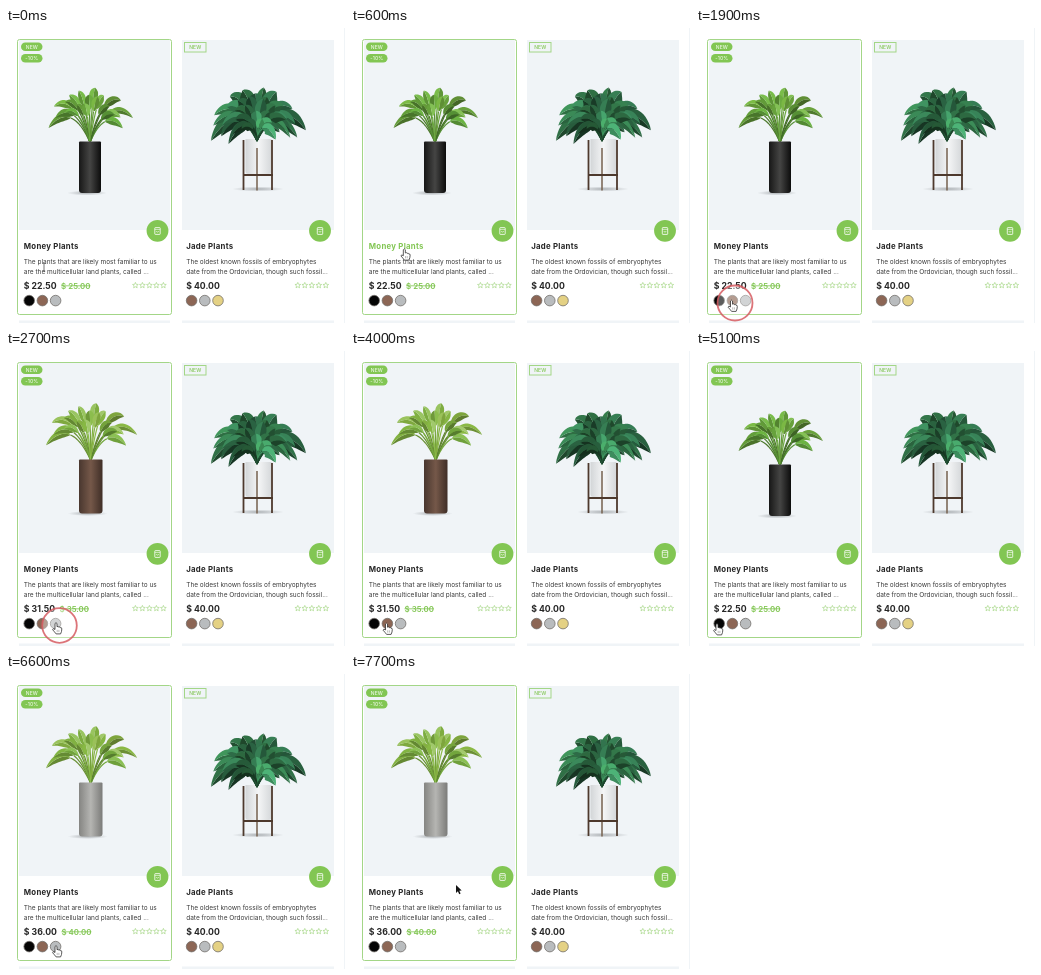
Write an HTML page with a canvas that moves like this. It is 339 by 295 pixels and loops after 7800 ms.

```html
<!DOCTYPE html>
<html lang="en">
<head>
<meta charset="utf-8">
<title>Plant shop</title>
<style>
html, body { margin: 0; width: 100%; height: 100%; overflow: hidden; background: #fff; }
canvas { display: block; width: 339px; height: 295px; }
</style>
</head>
<body>
<canvas id="stage"></canvas>
<script>
const W = 339, H = 295, LOOP = 7800;
const GREEN = '#82c653', INK = '#262626', RING = '#74706d';
const BROWN = '#8c6655', GRAY = '#b9bcbe';
const stage = document.getElementById('stage');
const scale = Math.max(1, window.devicePixelRatio || 1);
stage.width = W * scale;
stage.height = H * scale;
const g = stage.getContext('2d');

const variants = [
  { price: '$ 22.50', old: '$ 25.00', pot: ['#171717', '#454544', '#0c0c0c'] },
  { price: '$ 31.50', old: '$ 35.00', pot: ['#49372f', '#755849', '#3f2e27'] },
  { price: '$ 36.00', old: '$ 40.00', pot: ['#858582', '#b5b5b2', '#7b7b79'] }
];

// The pointer sweeps back and forth over the three swatches.
const picks = Array.from({ length: 6 }, (_, i) => ({
  at: 2000 + i * 870,
  item: 1 + Math.round(Math.sin((i * Math.PI) / 2))
}));

const spot = item => [21 + item * 14.5, 272.5 - item * .5];
const path = [[0, 38, 239], [450, 46, 221], [900, 74, 220], [1100, 79.5, 237]];
picks.forEach(({ at, item }, i) => {
  if (i) path.push([at - 380, ...spot(picks[i - 1].item)]);
  path.push([at - 200, ...spot(item)]);
});
path.push([6750, ...spot(2)], [7600, 105, 211]);

const clamp = v => Math.min(1, Math.max(0, v));
const ease = p => p * p * (3 - 2 * p);

function pose(t) {
  const next = path.findIndex(k => k[0] > t);
  if (next < 0) return path[path.length - 1].slice(1);
  const [t0, x0, y0] = path[next - 1], [t1, x1, y1] = path[next];
  const e = ease((t - t0) / (t1 - t0));
  return [x0 + (x1 - x0) * e, y0 + (y1 - y0) * e];
}

function seeded(seed) {
  return () => {
    seed = (seed * 16807) % 2147483647;
    return seed / 2147483647;
  };
}

function roundBox(x, y, w, h, r) {
  g.beginPath();
  g.roundRect(x, y, w, h, r);
}

function disc(x, y, r, fill, stroke, width) {
  g.beginPath();
  g.arc(x, y, r, 0, Math.PI * 2);
  if (fill) { g.fillStyle = fill; g.fill(); }
  if (stroke) { g.strokeStyle = stroke; g.lineWidth = width; g.stroke(); }
}

function line(x0, y0, x1, y1, color, width) {
  g.beginPath();
  g.moveTo(x0, y0);
  g.lineTo(x1, y1);
  g.strokeStyle = color;
  g.lineWidth = width;
  g.stroke();
}

function text(str, x, y, size, weight, color, spacing = 0) {
  g.font = `${weight} ${size}px Inter, Roboto, sans-serif`;
  g.letterSpacing = spacing + 'px';
  g.fillStyle = color;
  g.fillText(str, x, y);
  return g.measureText(str).width;
}

function bands(x, w, colors) {
  const fill = g.createLinearGradient(x, 0, x + w, 0);
  colors.forEach((c, i) => fill.addColorStop(i / (colors.length - 1), c));
  return fill;
}

function shadow(x, y, rx, ry) {
  g.save();
  g.translate(x, y);
  g.scale(rx, ry);
  const fill = g.createRadialGradient(0, 0, 0, 0, 0, 1);
  fill.addColorStop(0, 'rgba(70,75,80,.4)');
  fill.addColorStop(1, 'rgba(70,75,80,0)');
  disc(0, 0, 1, fill);
  g.restore();
}

// A drooping stem whose outer part widens into a two-tone blade.
function leaf(x, y, dx, dy, lift, from, width, hue, sat, light) {
  const cx = x + dx * .45, cy = y - lift;
  const at = u => [2 * u * (1 - u) * cx + (1 - u) ** 2 * x + u * u * (x + dx),
    2 * u * (1 - u) * cy + (1 - u) ** 2 * y + u * u * (y + dy)];
  const tone = l => `hsl(${hue},${sat}%,${l}%)`;
  const spine = [], sides = [[], []];
  for (let i = 0; i <= 14; i++) {
    const v = i / 14, u = from + (1 - from) * v;
    const [px, py] = at(u), [qx, qy] = at(u + .01);
    const len = Math.hypot(qx - px, qy - py) || 1;
    const half = width * Math.sin(Math.PI * v ** .85) ** .8 || 0;
    const nx = (qy - py) / len * half, ny = (px - qx) / len * half;
    spine.push([px, py]);
    sides[0].push([px + nx, py + ny]);
    sides[1].push([px - nx, py - ny]);
  }
  g.beginPath();
  g.moveTo(x, y);
  for (let u = 0; u <= from; u += .05) g.lineTo(...at(u));
  g.lineTo(...spine[0]);
  g.strokeStyle = tone(light - 4);
  g.lineWidth = 1.2;
  g.stroke();
  sides.forEach((side, k) => {
    g.beginPath();
    spine.forEach(p => g.lineTo(...p));
    side.slice().reverse().forEach(p => g.lineTo(...p));
    g.fillStyle = tone(light + ((k === 0) === (dx < 0) ? -6 : 5));
    g.fill();
  });
}

function foliage({ x, y, rx, ry, count, spread, width, from, hue, sat, light, vary, near, seed }) {
  const rnd = seeded(seed);
  for (let i = 0; i < count; i++) {
    const a = (((i + .5) * .618) % 1 * 2 - 1) * spread;
    const reach = (1 - (1 - near) * i / count) * (.85 + rnd() * .2);
    const dx = Math.sin(a) * rx * reach, dy = -Math.cos(a) * ry * reach;
    leaf(x, y, dx, dy, ry * reach * (.75 + .15 * rnd()), from, width * (.8 + rnd() * .4),
      hue + rnd() * 8, sat, light + (rnd() - .5) * vary);
  }
}

function moneyPlant(item) {
  const dark = item === 0;
  const x = 73, w = dark ? 22 : 23.5, y = dark ? 113.5 : 108.5, bottom = dark ? 165 : 162.5;
  shadow(x + w / 2 - 3, bottom, 20, 2.5);
  foliage({
    x: x + w / 2, y: y + 1, rx: dark ? 50 : 54, ry: dark ? 64 : 67, count: 19, spread: 1.35,
    width: 3.7, from: .48, hue: dark ? 91 : 82, sat: 46, light: dark ? 41 : 47,
    vary: 18, near: .62, seed: 71
  });
  roundBox(x, y, w, bottom - y, [1, 1, 3, 3]);
  g.fillStyle = bands(x, w, variants[item].pot);
  g.fill();
}

function jadePlant() {
  const wood = '#4d392d';
  shadow(252, 161, 26, 2.5);
  roundBox(239.5, 111, 26, 35, [0, 0, 3, 3]);
  g.fillStyle = bands(239.5, 26, ['#d3d6d8', '#f4f5f6', '#d5d8da']);
  g.fill();
  line(251, 120, 251, 162.5, '#75604e', 1.5);
  line(237, 147, 267, 147, wood, 2);
  [237.5, 266].forEach(x => line(x, 112, x, 162, wood, 1.8));
  const plant = { x: 251, y: 113, rx: 55, ry: 64, hue: 138, sat: 40 };
  foliage({ ...plant, count: 23, spread: 1.62, width: 6.2, from: .42, light: 29, vary: 18, near: .62, seed: 29 });
  foliage({ ...plant, y: 108, count: 17, spread: 1.9, width: 4.8, from: .3, light: 32, vary: 28, near: .4, rx: 39, ry: 40, seed: 83 });
}

function cart(x) {
  disc(x, 202.8, 10.9, GREEN);
  g.strokeStyle = '#fff';
  g.lineWidth = .8;
  roundBox(x - 2.7, 199.6, 5.4, 6.8, .6);
  g.stroke();
  line(x - 2.7, 201.4, x + 2.7, 201.4, '#fff', .6);
  g.beginPath();
  g.arc(x, 203, 1.1, 0, Math.PI);
  g.stroke();
}

function stars(x) {
  g.strokeStyle = '#a3d583';
  g.lineWidth = .65;
  for (let i = 0; i < 5; i++) {
    g.beginPath();
    for (let k = 0; k < 10; k++) {
      const r = k % 2 ? 1.35 : 3, a = k * Math.PI / 5 - Math.PI / 2;
      g.lineTo(x + i * 7 + r * Math.cos(a), 257.4 + r * Math.sin(a));
    }
    g.closePath();
    g.stroke();
  }
}

function card(x, title, color, lines, price, swatches) {
  text(title, x, 221.4, 7.8, 700, color, .27);
  lines.forEach((s, i) => text(s, x, 236.3 + i * 10, 6.5, 400, '#3b3b3b'));
  const w = text(price, x, 260.8, 8.7, 700, INK);
  swatches.forEach((c, i) => disc(x + 5.4 + i * 13.2, 272.6, 5.3, c, RING, .8));
  stars(x + 111.6);
  return x + w;
}

function badge(str, y) {
  roundBox(15, y, 21.5, 8.6, 4.3);
  g.fillStyle = GREEN;
  g.fill();
  g.textAlign = 'center';
  text(str, 25.8, y + 6.1, 5, 500, '#eef8e8', .1);
  g.textAlign = 'left';
}

function pointer(t) {
  const [x, y] = pose(t);
  g.save();
  g.translate(x, y);
  g.lineJoin = 'round';
  if (t < 250) {
    line(0, -3.5, 0, 4, '#555', .8);
    [-3.8, 4.2].forEach(v => line(-1.3, v, 1.3, v, '#555', .6));
  } else if (t > 6900) {
    const arrow = new Path2D('M0 0V8L1.9 6.3 3.2 9.2 4.6 8.6 3.3 5.8 5.7 5.6Z');
    g.strokeStyle = '#fff';
    g.lineWidth = 1;
    g.stroke(arrow);
    g.fillStyle = '#141414';
    g.fill(arrow);
  } else {
    const hand = new Path2D('M-1 7V1Q0 -.7 1 1V4.2Q2.2 3.4 2.8 4.6 4 4 4.4 5.2 5.8 4.8 5.8 6.4 5.8 9 4.6 11.4H.1Q-1.4 9.4 -3.4 7.2 -3 5.2 -1 7Z');
    g.fillStyle = '#fff';
    g.fill(hand);
    g.strokeStyle = '#333';
    g.lineWidth = .8;
    g.stroke(hand);
    [1.2, 2.9].forEach(v => line(v, 7.3, v, 9.6, '#777', .5));
  }
  g.restore();
}

function clickRing(t) {
  picks.forEach(({ at, item }) => {
    const p = (t - at + 230) / 380;
    if (p <= 0 || p >= 1) return;
    const [x, y] = spot(item);
    g.globalAlpha = clamp((1 - p) * 2.5);
    disc(x + 3.5, y + 3, 12 + 5.5 * clamp(p * 6), 'rgba(255,255,255,.35)', 'rgba(214,92,98,.85)', 1.8);
    g.globalAlpha = 1;
  });
}

function titleColor(t) {
  const k = clamp(Math.min((t - 350) / 150, (1300 - t) / 150));
  const mix = (a, b) => Math.round(a + (b - a) * k);
  return `rgb(${mix(38, 130)},${mix(38, 198)},${mix(38, 83)})`;
}

function draw(t) {
  g.setTransform(scale, 0, 0, scale, 0, 0);
  g.fillStyle = '#fff';
  g.fillRect(0, 0, W, H);
  g.fillStyle = '#f0f4f7';
  g.fillRect(338, 0, 1, H);
  [[13, 151], [176, 152]].forEach(([x, w]) => {
    g.fillRect(x, 12, w, 190);
    g.fillRect(x, 292.5, w, 3);
  });
  roundBox(11.5, 11.5, 154, 275, 2);
  g.strokeStyle = '#a3d687';
  g.lineWidth = 1;
  g.stroke();

  const item = picks.reduce((now, p) => p.at <= t ? p.item : now, 0);
  const { price, old } = variants[item];
  moneyPlant(item);
  jadePlant();

  badge('NEW', 14.5);
  badge('-10%', 26);
  g.strokeStyle = '#a3d687';
  g.lineWidth = 1;
  g.strokeRect(178.5, 14.5, 21.5, 9.5);
  text('NEW', 183.2, 21.2, 5, 500, GREEN, .1);
  cart(151.5);
  cart(314);

  const end = card(17.8, 'Money Plants', titleColor(t),
    ['The plants that are likely most familiar to us', 'are the multicellular land plants, called ...'],
    price, ['#050505', BROWN, GRAY]);
  const w = text(old, end + 4.5, 260.6, 7.9, 600, GREEN);
  line(end + 4.5, 257.8, end + 4.5 + w, 257.8, GREEN, .8);
  card(180.2, 'Jade Plants', INK,
    ['The oldest known fossils of embryophytes', 'date from the Ordovician, though such fossil...'],
    '$ 40.00', [BROWN, GRAY, '#e4d184']);

  clickRing(t);
  pointer(t);
}

const start = performance.now();
function tick() {
  draw((performance.now() - start) % LOOP);
  requestAnimationFrame(tick);
}
tick();
</script>
</body>
</html>
```
